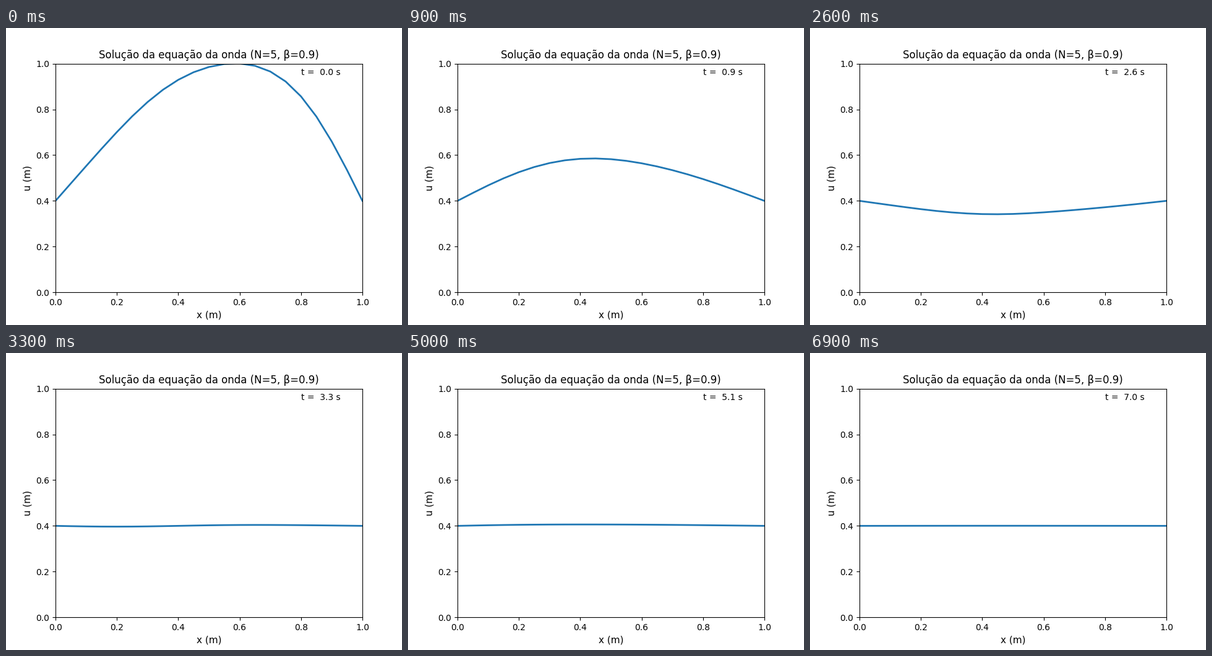
A matplotlib script that plays this animation: 640 by 480 pixels, repeating every 7 s.

```python
import numpy as np
import matplotlib.pyplot as plt
from matplotlib.animation import FuncAnimation

FRAMES = 70
BETA = 0.9   # damping
N = 5        # highest frequency index
REST = 0.4   # equilibrium height

plt.rcParams["font.family"] = "DejaVu Sans"

x = np.linspace(0, 1, 21)
clock = np.linspace(0, 7, FRAMES)


def wave(t):
    """Damped sum of sine modes released from rest."""
    u = np.zeros_like(x)
    for n in range(1, N):
        amp = 6 * (-1) ** (n + 1) / (np.pi**2 * n**3)
        w = np.sqrt(((n + 1) * np.pi) ** 2 - BETA**2)
        swing = np.cos(w * t) + BETA / w * np.sin(w * t)
        u += amp * swing * np.sin(n * np.pi * x)
    return REST + np.exp(-BETA * t) * u


fig, ax = plt.subplots(figsize=(6.4, 4.8), dpi=100)
ax.set_xlim(0, 1)
ax.set_ylim(0, 1)
ax.set_title("Solução da equação da onda (N=5, β=0.9)", fontsize=12)
ax.set_xlabel("x (m)", fontsize=11)
ax.set_ylabel("u (m)", fontsize=11)
line, = ax.plot(x, wave(0), color="#1f77b4", lw=2)
label = ax.text(0.8, 0.95, "", fontsize=10)


def update(i):
    line.set_ydata(wave(0.1 * i))
    label.set_text(f"t = {clock[i]:4.1f} s")
    return line, label


anim = FuncAnimation(fig, update, frames=FRAMES, interval=100,
                     repeat=True, repeat_delay=0)
plt.show()
```
